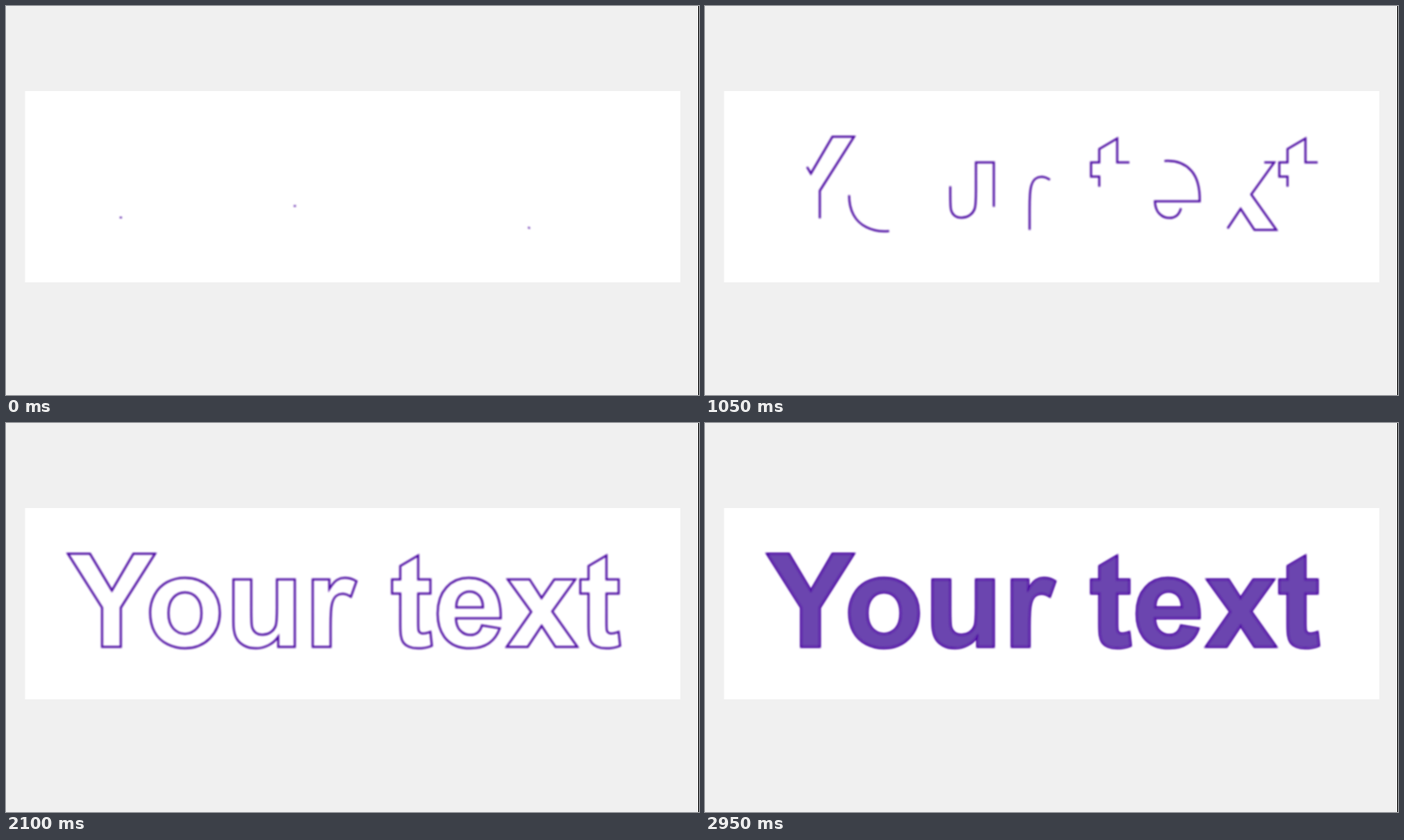
These frames come from a looping animation (854x480 px, 3000 ms). An HTML page with a canvas:

```html
<!DOCTYPE html>
<html lang="en">
<head>
<meta charset="utf-8">
<title>Your text</title>
<style>
html, body { margin: 0; width: 100%; height: 100%; overflow: hidden; background: #f0f0f0; }
canvas { display: block; }
</style>
</head>
<body>
<canvas id="stage" width="854" height="480" role="img" aria-label="Your text"></canvas>
<script>
const ctx = document.getElementById('stage').getContext('2d');

const LOOP = 3000, STEP = 50, DRAWN = 2100, FILL = 2400;
const BASE = 276.2;      // baseline
const UNIT = 0.0784;     // pixels per font unit
const PERIOD = 399.5;    // dash period in pixels

// Letter outlines in font units, y up
const Y = 'M534 0v617l-537 849h347l345-580l338 580h341l-539-851v-615z';
const o = 'M82 546q0 140 69 271t195.5 200t282.5 69q241 0 395-156.5t154-395.5' +
  'q0-241-155.5-399.5t-391.5-158.5q-146 0-278.5 66t-201.5 193.5t-69 310.5z' +
  'M370 531q0-158 75-242t185-84t184.5 84t74.5 244q0 156-74.5 240t-184.5 84t-185-84t-75-242z';
const u = 'M844 0v159q-58-85-152.5-134t-199.5-49q-107 0-192 47t-123 132t-38 235v672h281v-488' +
  'q0-224 15.5-274.5t56.5-80t104-29.5q72 0 129 39.5t78 98t21 286.5v448h281v-1062z';
const r = 'M416 0h-281v1062h261v-151q67 107 120.5 141t121.5 34q96 0 185-53l-87-245' +
  'q-71 46-132 46q-59 0-100-32.5t-64.5-117.5t-23.5-356z';
const t = 'M633 1062v-224h-192v-428q0-130 5.5-151.5t25-35.5t47.5-14q39 0 113 27l24-218' +
  'q-98-42-222-42q-76 0-137 25.5t-89.5 66t-39.5 109.5q-9 49-9 198v463h-129v224h129v211l282 164v-375z';
const e = 'M762 338l280-47q-54-154-170.5-234.5t-291.5-80.5q-277 0-410 181q-105 145-105 366' +
  'q0 264 138 413.5t349 149.5q237 0 374-156.5t131-479.5h-704q3-125 68-194.5t162-69.5q66 0 111 36t68 116z' +
  'M778 622q-3 122-63 185.5t-146 63.5q-92 0-152-67t-59-182z';
const x = 'M12 0l385 550l-369 512h343l189-294l200 294h330l-362-505l395-557h-345l-217 330l-219-330z';

const word = new Path2D();
function place(outline, left) {
  word.addPath(new Path2D(outline), new DOMMatrix([UNIT, 0, 0, -UNIT, left, BASE]));
}
place(Y, 76.5);
place(o, 171.2);
place(u, 269.3);
place(r, 367.4);
place(t, 473.4);
place(e, 526.8);
place(x, 616.1);
place(t, 705.4);

function box(color, left, top, width, height) {
  ctx.fillStyle = color;
  ctx.fillRect(left, top, width, height);
}

function draw(time) {
  ctx.filter = 'none';
  box('#f0f0f0', 0, 0, 854, 480);
  box('#000', 853, 0, 1, 480);
  ctx.filter = 'blur(0.6px)';
  box('#fff', 23.5, 105, 807.5, 236);

  ctx.filter = 'blur(0.9px)';
  const p = Math.max(0, (time - FILL) / (LOOP - FILL));
  if (p > 0) {
    // Colour and opacity both rise from transparent black
    const rgb = [103, 58, 183].map(c => Math.round(c * p));
    ctx.fillStyle = `rgba(${rgb}, ${p})`;
    ctx.fill(word);
  }

  // Each dash grows backwards from a fixed end
  const gap = PERIOD * (1 - Math.min(1, (time + 10) / DRAWN));
  ctx.setLineDash(gap > 0 ? [PERIOD - gap, gap] : []);
  ctx.lineDashOffset = -gap;
  ctx.lineWidth = 2.5;
  ctx.miterLimit = 4;
  ctx.strokeStyle = '#4806a0';
  ctx.stroke(word);
}

const start = performance.now();
function frame() {
  const time = (performance.now() - start) % LOOP;
  draw(Math.floor(time / STEP) * STEP);
  requestAnimationFrame(frame);
}
frame();
</script>
</body>
</html>
```
